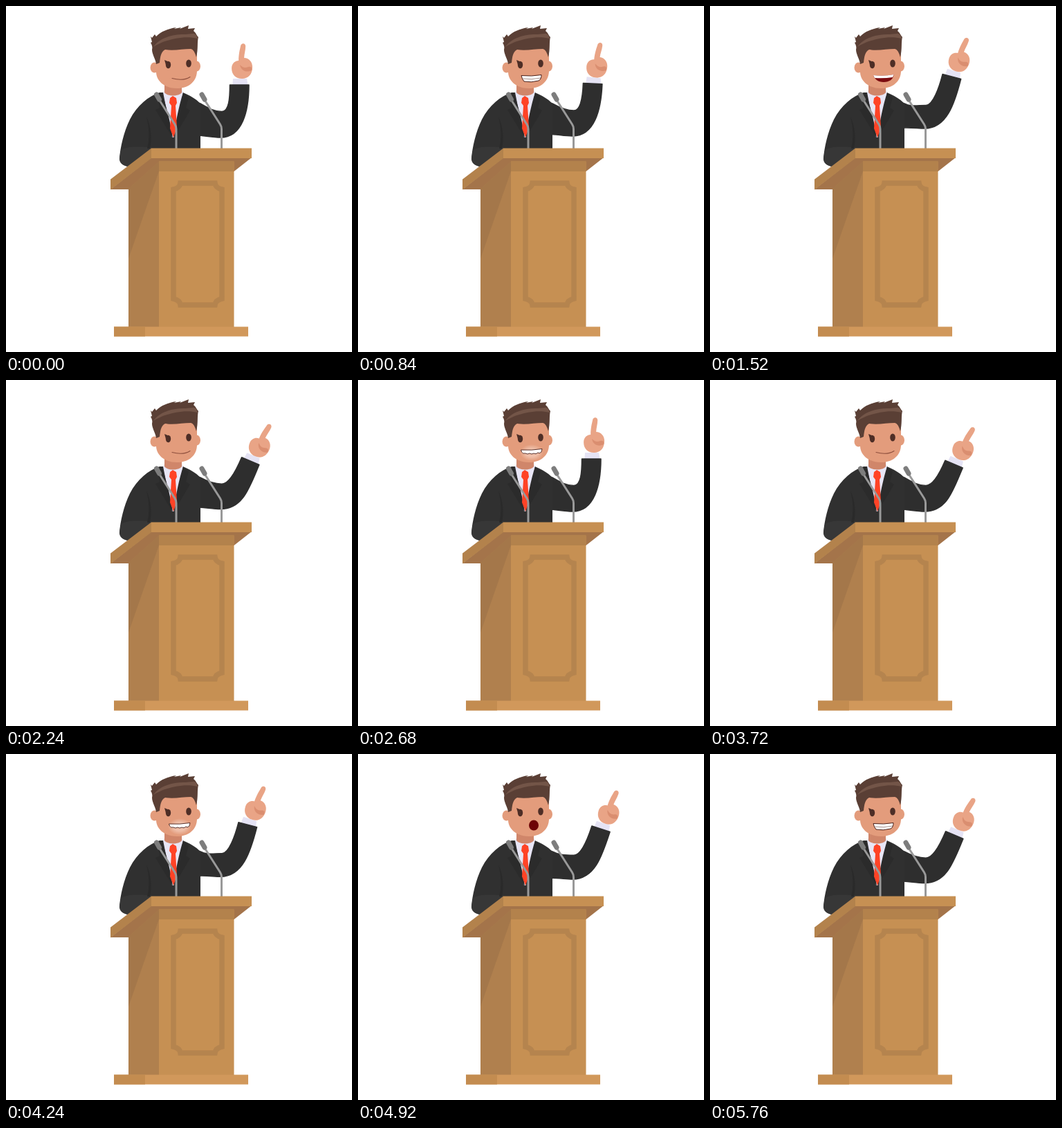
An HTML page for the animation above (5.8 s loop, 500 px wide and 500 px high).

```html
<!DOCTYPE html>
<html lang="en">
<head>
<meta charset="utf-8">
<title>Speaker at a lectern</title>
<style>
  html, body { margin: 0; width: 100%; height: 100%; overflow: hidden; background: #fff; }
  svg { display: block; width: 100%; height: 100%; }
  .mouth { display: none; }
</style>
</head>
<body>
<svg viewBox="0 0 500 500">
  <radialGradient id="glow">
    <stop offset=".5" stop-color="#efbfa9"/>
    <stop offset="1" stop-color="#efbfa9" stop-opacity="0"/>
  </radialGradient>

  <!-- raised arm, hand drawn around the wrist at 0,0 -->
  <g id="hand">
    <path fill="#e5e3f4" d="M-9-7L11-7L13 5L-10 6Z"/>
    <path fill="#e9a486" d="M-1-33C-1-43 1-50 2-55C3-59 9-59 9-54C9-48 7-42 7-37C14-37 19-31 19-24C19-13 13-7 4-7C-5-7-11-13-11-22C-11-29-6-33-1-33Z"/>
    <path fill="#da8e70" d="M1-27C2-19 10-15 18-19C19-24 16-25 13-24C8-22 5-23 1-27Z"/>
  </g>
  <path id="arm" fill="#2e2e2e" stroke="#2e2e2e" stroke-width="1.500" stroke-linejoin="round"/>

  <!-- jacket -->
  <path fill="#303030" d="M222 125C206 130 189 144 179 164C170 182 165 205 164 220C165 228 170 231 177 232L212 206H281V141C274 134 266 129 255 125Z"/>
  <path fill="#373737" d="M166 209C172 203 184 203 210 204V208L177 232C168 231 163 226 164 219Z"/>
  <path fill="#2a2a2a" d="M204 206C208 190 207 177 203 160C210 175 211 193 208 206Z"/>
  <path fill="#e8e6f6" d="M227 125L230 119H253L256 125L243 190H240Z"/>
  <path fill="#2b2b2b" d="M225 125L219 131L222 147L216 150L241 191C238 168 231 143 225 125ZM256 125L264 132L260 147L266 151L242 191C245 168 250 144 256 125Z"/>
  <path fill="#ff4326" d="M237 133L241 130L246 133L247 140L245 144L247 176L242 190L237 177L239 144L236 140Z"/>
  <path fill="#d0866a" d="M229 110H254V125C250 131 233 131 229 125Z"/>

  <!-- head -->
  <g fill="#e39c7c">
    <ellipse cx="214.500" cy="89" rx="6" ry="7.500"/>
    <ellipse cx="275.500" cy="87" rx="5.500" ry="7.500"/>
    <path d="M217 66C218 58 230 54 247 54C265 54 276 59 276 70V91C277 109 264 119 247 119C229 119 216 108 217 93Z"/>
  </g>
  <path fill="#5a3f35" d="M209 44L211 46L215 41L217 44C224 37 233 33 246 31L243 33L253 31L251 33L264 28L263 33L273 32L271 36C275 39 275 42 278 45C276 52 278 62 275 74C273 67 271 63 267 62C256 62 242 65 230 63C224 66 223 73 222 82L217 84C216 76 211 70 211 63C212 60 211 56 209 53L211 52Z"/>
  <path fill="#735548" d="M213 59C222 46 241 41 256 41C266 41 272 38 275 42L277 47C260 43 244 47 233 50C225 52 218 56 213 59Z"/>
  <g fill="#4e2e26">
    <ellipse cx="234.500" cy="85" rx="3.700" ry="5.300"/>
    <ellipse cx="264" cy="83" rx="3.800" ry="5.500"/>
    <path d="M229 78L236 81L231 85Z"/>
  </g>

  <!-- mouths -->
  <path class="mouth" id="c" fill="none" stroke="#8c4e3c" stroke-width="1.100" stroke-linecap="round" d="M240 104.500C249 107 259 107 266 102.500"/>
  <g class="mouth" id="g" stroke="#4a2019">
    <path fill="#fff" d="M236 100.500Q251 102 265 99.500Q265 106 261 108Q250 111 240 109Q237 106 236 100.500Z"/>
    <path fill="none" stroke-width=".5" d="M238 105Q251 107 264 104"/>
  </g>
  <g class="mouth" id="l">
    <path fill="#7b0b10" d="M236 100Q251 102 265.500 99C265 106 259 110 251 110C243 110 238 106 236 100Z"/>
    <path fill="#fff" d="M236 100Q251 102 265.500 99L264 103Q251 105 238 104Z"/>
  </g>
  <g class="mouth" id="w">
    <ellipse cx="251" cy="105" rx="17" ry="12" fill="url(#glow)"/>
    <path fill="#fff" stroke="#4a2019" stroke-width=".9" d="M235.500 101Q251 102 266 99.500L265 104Q262 107 260 105Q257 108 254 106Q251 108 248 106Q245 108 242 106Q238 107 236.500 104Z"/>
  </g>
  <ellipse class="mouth" id="o" cx="254" cy="103" rx="7" ry="7.500" fill="#6d0305"/>

  <!-- microphones -->
  <g id="mic" fill="none">
    <path stroke="#999" stroke-width="3" stroke-linejoin="round" d="M221 135L244 171Q246 174 246 178V207"/>
    <path stroke="#7d7d7d" stroke-width="7" stroke-linecap="round" d="M217.500 128L221.500 135"/>
  </g>
  <use href="#mic" x="65.500"/>

  <!-- lectern -->
  <path fill="#a4744a" d="M151 265L210 219H355L329.500 239H221L177 265Z"/>
  <path fill="#b0804e" d="M177 264L221 225V464H177Z"/>
  <path fill="#a4774a" d="M177 264L221 225V239L177 365Z"/>
  <path fill="#c69053" d="M221 225H329.500V464H221Z"/>
  <path fill="#b3824c" d="M221 224H329.500V239H221Z"/>
  <path fill="#b3824c" d="M151 250.500L210 205.500V220L151 265.500Z"/>
  <path fill="#c69053" d="M210 205.500H355V220H210Z"/>
  <path fill="none" stroke="#b5844e" stroke-width="7.500" d="M252 256H302Q303 263 312 265V423Q303 425 302 432H252Q251 425 242 423V265Q251 263 252 256Z"/>
  <path fill="#d1985b" d="M156 463.500H350V477.500H156Z"/>
  <path fill="#c38c50" d="M156 463.500H201V477.500H156Z"/>
</svg>
<script>
const $ = id => document.getElementById(id);
const LOOP = 5800, STEP = 40, CYCLE = 1760, LAG = 40;
const SYLLABLE = 280, SPEECH = "clwgolcgcwolo";

const ease = u => {
  u = Math.min(1, Math.max(0, u));
  return u * u * (3 - 2 * u);
};
// rises from a to b, holds, falls from c to d
const pulse = (t, a, b, c, d) => ease((t - a) / (b - a)) - ease((t - c) / (d - c));

// the arm swings outwards twice per cycle, each time with a lift of the elbow
const swing = t => 23 * pulse(t, 0, 150, 590, 900) + 18 * pulse(t, 1100, 1380, 1430, 1740);
const lift = t => 14 * pulse(t, 400, 650, 680, 890) + 13 * pulse(t, 1160, 1540, 1580, 1760);

function drawArm(t) {
  const angle = swing(t), up = lift(t);
  const hand = swing((t + CYCLE - LAG) % CYCLE);
  const x = 337 + 0.7 * angle + 0.2 * up;
  const y = 112 + 0.33 * angle - 1.3 * up;
  const s = Math.sin(angle * Math.PI / 180), c = Math.cos(angle * Math.PI / 180);
  const at = (px, py) => `${x + px * c - py * s} ${y + px * s + py * c} `;
  const inner = 152.5 - 0.7 * up, outer = 190 - up;
  $("arm").setAttribute("d",
    `M262 135L281 141C290 146 300 ${inner} 312 ${inner}` +
    `C322 ${inner} ${at(-13.5, 22)}${at(-13.5, 2)}L${at(14, 2)}` +
    `C${at(14, 39)}342 ${outer} 310 ${outer}` +
    `C300 ${outer} 290 ${outer - 2} 275 ${186.5 - 0.8 * up}Z`);
  $("hand").setAttribute("transform", `translate(${x} ${y}) rotate(${hand})`);
}

function draw(now) {
  const t = Math.floor(now % LOOP / STEP) * STEP;
  drawArm(t % CYCLE);
  const shape = SPEECH[Math.floor(t / SYLLABLE) % SPEECH.length];
  for (const m of document.querySelectorAll(".mouth"))
    m.style.display = m.id === shape ? "inline" : "none";
  requestAnimationFrame(() => draw(performance.now() - start));
}

const start = performance.now();
draw(0);
</script>
</body>
</html>
```
